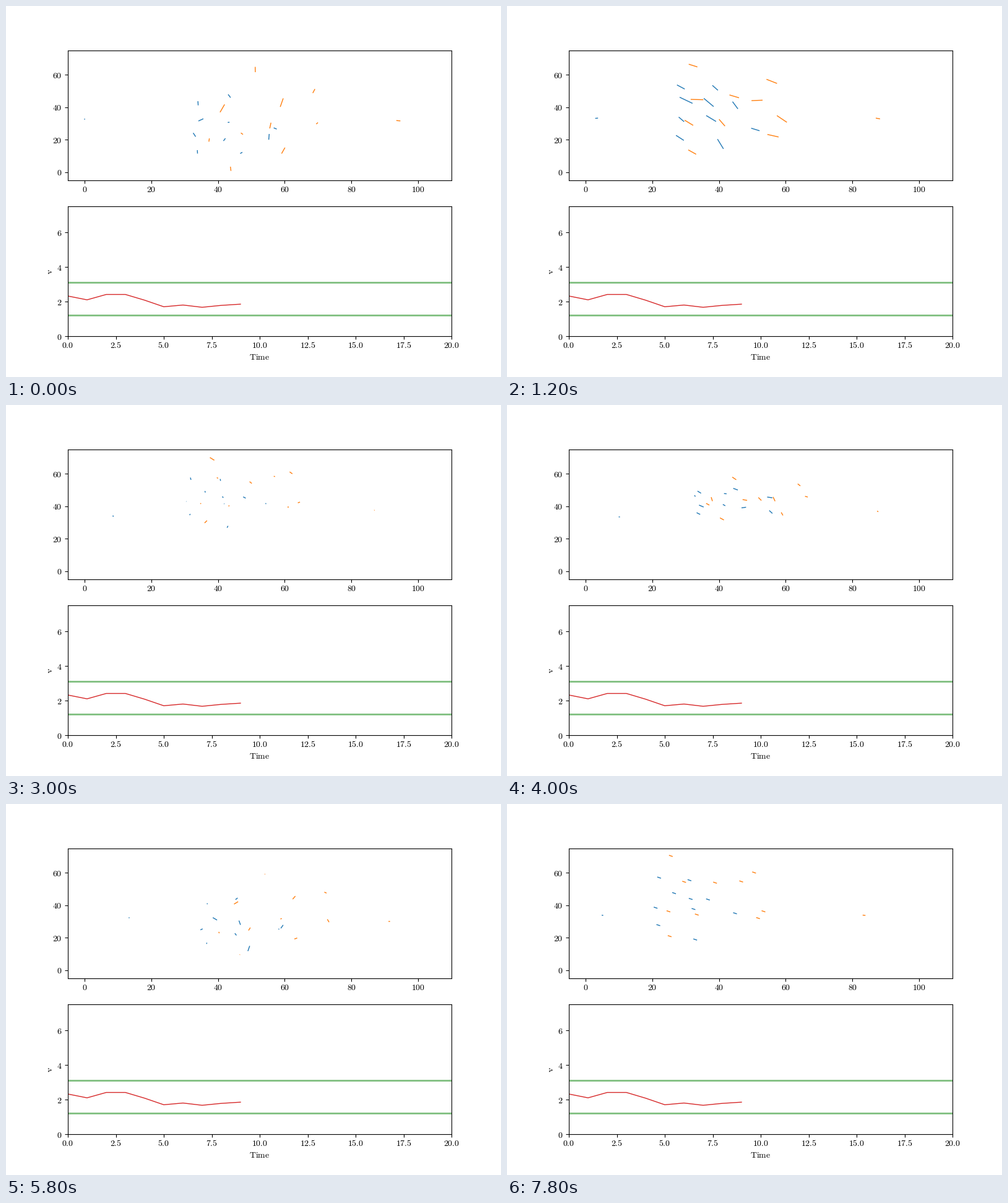
Animation of 800x600 px, one loop 8000 ms. Source, as a matplotlib script:

```python
import numpy as np
import matplotlib.pyplot as plt
from matplotlib.animation import FuncAnimation

plt.rcParams["mathtext.fontset"] = "cm"

FRAMES, STEP_MS = 40, 200
BLUE, ORANGE = "tab:blue", "tab:orange"
KNOTS = np.array([0, 6, 11, 20, 29, 35, 39])

fig, (field, chart) = plt.subplots(2, 1, figsize=(8, 6), dpi=100)


def roman(text):
    return rf"$\mathrm{{{text}}}$"


def set_ticks(axis, values, digits=0):
    axis.set_ticks(values, [roman(f"{v:.{digits}f}") for v in values])


field.set(xlim=(-5, 110), ylim=(-5, 75))
set_ticks(field.xaxis, range(0, 101, 20))
set_ticks(field.yaxis, range(0, 61, 20))

chart.set(xlim=(0, 20), ylim=(0, 7.5))
set_ticks(chart.xaxis, np.arange(0, 20.1, 2.5), 1)
set_ticks(chart.yaxis, range(0, 7, 2))
chart.set_xlabel(roman("Time"), labelpad=3)
chart.set_ylabel(roman("v"), labelpad=2.5)
for ax in (field, chart):
    ax.tick_params(axis="x", pad=2.5)

speed = [2.32, 2.10, 2.41, 2.41, 2.08, 1.70, 1.80, 1.67, 1.78, 1.85]
chart.plot(range(10), speed, color="tab:red", lw=1)
for level in (1.2, 3.1):
    chart.axhline(level, color="green", alpha=0.5, lw=2)


def curve(values, slopes=None):
    """Smooth cubic through the knots, sampled half a tick around each frame."""
    values = np.array(values, float)
    slopes = np.gradient(values, KNOTS) if slopes is None else np.array(slopes)
    t = np.arange(FRAMES + 1) - 0.5
    k = np.clip(np.searchsorted(KNOTS, t, side="right") - 1, 0, len(KNOTS) - 2)
    span = KNOTS[k + 1] - KNOTS[k]
    u = (t - KNOTS[k]) / span
    ease = u * u * (3 - 2 * u)
    return (values[k] + (values[k + 1] - values[k]) * ease
            + span * (slopes[k] * u * (1 - u) ** 2
                      - slopes[k + 1] * u * u * (1 - u)))


# Play moves everyone together: sway, change of formation, squeeze in height
sway_x = curve([0, 0, -8, 11, 17, 13, -31], [2, -16, 17, 5, -2, -17, -6])
sway_y = curve([0, 0, -24, -27, -3, 0, -15], [-6, -8, -1, 3, -2, -4, -2])
pushed = curve([0, 1, 1, 0.5, 0, 1, 1], np.zeros(7))
spread = curve([1, 1, 0.85, 0.45, 0.8, 1, 0.9], np.zeros(7))

rng = np.random.default_rng(4)
wander = np.sin(np.pi * (np.arange(FRAMES + 1) - 0.5) / 6)
players = []


def add_player(color, x, y):
    line, = field.plot([], [], color=color, lw=1, solid_capstyle="butt")
    # Stage pixels to field units
    players.append((line, (x - 100) * 115 / 620 - 5, (282 - y) * 80 / 210 - 5))


def add_team(color, rest, push):
    """Blend two formations, follow the play and let each player stray."""
    rest, push = np.array(rest), np.array(push)
    mid_y = rest[:, 1].mean() + pushed * (push - rest)[:, 1].mean()
    for start, goal in zip(rest, push):
        stray = rng.normal(0, 7, 2)
        x = start[0] + pushed * (goal - start)[0] + sway_x
        y = start[1] + pushed * (goal - start)[1]
        y = mid_y + (y - mid_y) * spread + sway_y
        add_player(color, x + stray[0] * wander, y + stray[1] * wander)


# Four backs, four midfielders, two forwards
add_team(BLUE,
         rest=[(310.5, 157), (315, 184), (304.5, 208), (309.5, 235.5),
               (361, 145), (360, 188), (353, 216), (380.5, 237),
               (436, 198), (425, 211)],
         push=[(281, 131), (289.5, 152.5), (282, 183.5), (279.5, 213.5),
               (336.5, 132.5), (326, 156), (330, 182), (345, 223.5),
               (368.5, 160.5), (401.5, 200)])
add_team(ORANGE,
         rest=[(404.5, 102), (498.5, 137), (350, 165), (428, 193.5),
               (446, 155.5), (328.5, 216.5), (381.5, 206), (503.5, 189),
               (448, 233.5), (364, 263)],
         push=[(300, 96.5), (427.5, 122), (307, 151.5), (367, 146),
               (404, 153), (294, 189), (347.5, 189), (444, 183),
               (430, 210), (299, 236.5)])

# Keepers follow paths of their own
add_player(BLUE,
           curve([127, 145, 158, 181.5, 199, 180.5, 154],
                 [1.5, 5, 6, 2, 1.5, -10, -2.5]),
           curve([183, 181.5, 179.5, 181, 184, 181.5, 180]))
add_player(ORANGE,
           curve([634, 599.5, 585.5, 599, 619.5, 600, 577],
                 [-6.5, -7, 5, 2, -3, -7.5, -4.5]),
           curve([185.5, 182, 173, 172, 190, 182, 180]))


def draw(frame):
    pair = slice(frame, frame + 2)
    for line, x, y in players:
        line.set_data(x[pair], y[pair])
    return [line for line, *_ in players]


anim = FuncAnimation(fig, draw, frames=FRAMES, interval=STEP_MS,
                     init_func=lambda: draw(0), repeat=True, repeat_delay=0)
plt.show()
```
